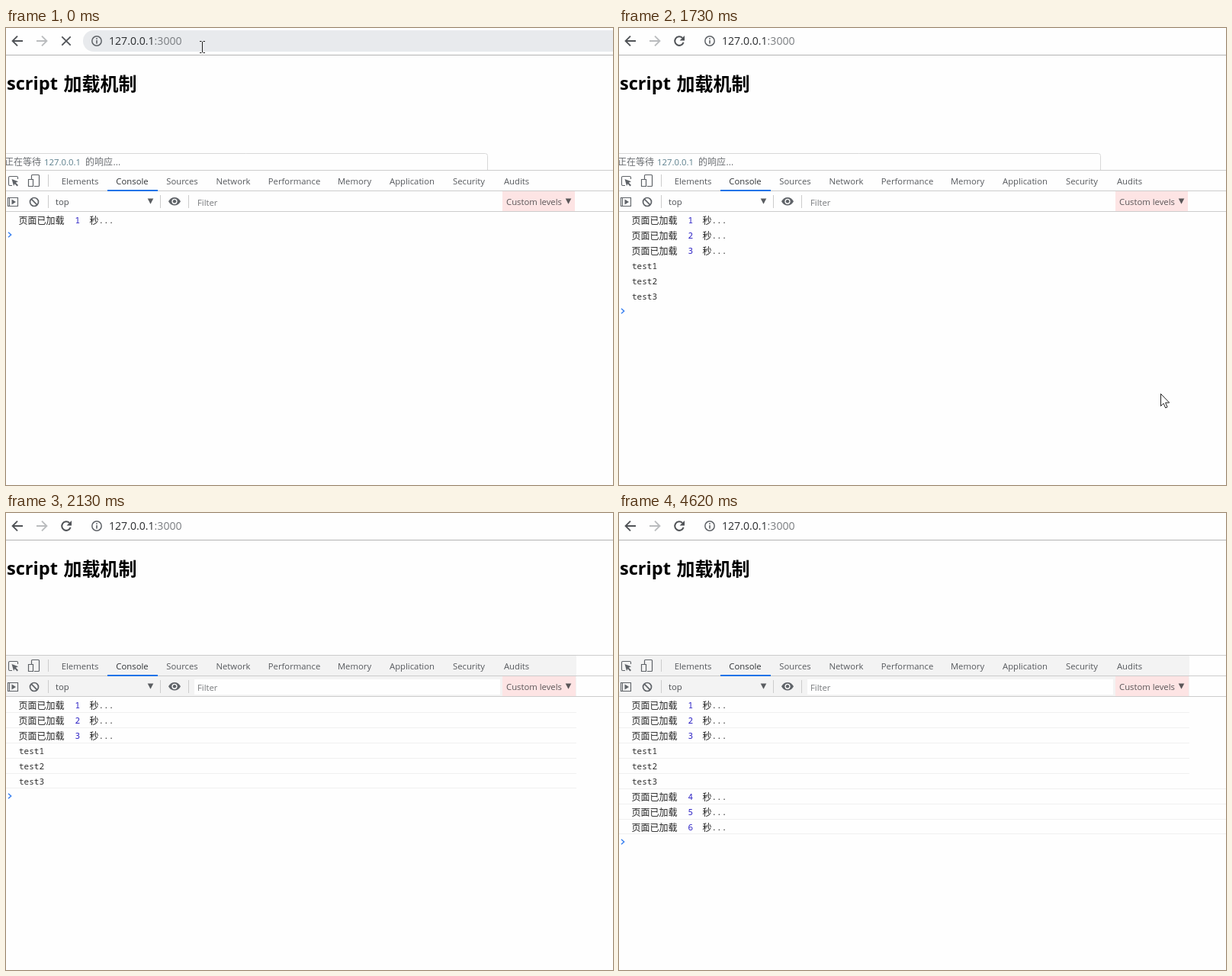
Write an HTML page with a canvas that moves like this. It is 796 px wide and 599 px high and loops after 4770 ms.

```html
<!DOCTYPE html>
<html lang="zh-CN">
<head>
<meta charset="utf-8">
<title>script 加载机制</title>
<style>
  html, body { margin: 0; width: 100%; height: 100%; overflow: hidden; background: #fefefe; }
  canvas { display: block; }
</style>
</head>
<body>
<canvas id="stage" width="796" height="599"></canvas>
<script>
const ctx = document.getElementById('stage').getContext('2d');
const W = 796, H = 599, LOOP = 4770;
const SANS = '"Open Sans", "Noto Sans", sans-serif';
const CJK = '"Noto Sans CJK SC", "Noto Sans CJK", sans-serif';
const MONO = '"Noto Sans Mono", "DejaVu Sans Mono", monospace';
const UI = `11.3px ${SANS}`;
const BG = '#fefefe', ICON = '#5f6368', RULE = '#cccccc';

const LOADED = 1730, IDLE = 1970, STATUS_END = 2130;

const tabs = [['Elements', 97], ['Console', 165.5], ['Sources', 231], ['Network', 298],
  ['Performance', 378], ['Memory', 457], ['Application', 532.5], ['Security', 607], ['Audits', 669.5]];

// Each log entry: time it appears, and a second count or a plain message
const log = [[0, 1], [710, 2], [1580, 3], [1730, 'test1'], [1730, 'test2'], [1730, 'test3'],
  [2680, 4], [3620, 5], [4620, 6]];

// Pointer stops: start time, x, y
const stops = [[1580, 434, 132], [1730, 710, 479], [1850, 736, 521]];

function text(str, x, y, font, color, align = 'left') {
  ctx.font = font;
  ctx.fillStyle = color;
  ctx.textAlign = align;
  ctx.fillText(str, x, y);
}

function rect(x, y, w, h, color) {
  ctx.fillStyle = color;
  ctx.fillRect(x, y, w, h);
}

function stroke(d, color, width = 1) {
  ctx.strokeStyle = color;
  ctx.lineWidth = width;
  ctx.stroke(new Path2D(d));
}

function fill(d, color) {
  ctx.fillStyle = color;
  ctx.fill(new Path2D(d));
}

function ring(x, y, r, color, width) {
  ctx.beginPath();
  ctx.arc(x, y, r, 0, Math.PI * 2);
  ctx.strokeStyle = color;
  ctx.lineWidth = width;
  ctx.stroke();
}

function disc(x, y, r, color) {
  ctx.beginPath();
  ctx.arc(x, y, r, 0, Math.PI * 2);
  ctx.fillStyle = color;
  ctx.fill();
}

function addressBar(t) {
  const loading = t < LOADED;
  if (loading) fill('M796 3H115a14 14 0 0 0 0 28H796z', '#e8eaed');
  stroke('M22 17H9.5M15 10.6L8.6 17L15 23.4', '#505357', 1.9);
  stroke('M40 17H52.5M47 10.6L53.4 17L47 23.4', '#babcbe', 1.9);
  if (loading) {
    stroke('M73.3 11.3L84.7 22.7M84.7 11.3L73.3 22.7', '#505357', 1.8);
  } else {
    stroke('M83.2 13A5.8 5.8 0 1 0 84.6 18.7', '#505357', 2);
    fill('M86 10V16.4H79.6z', '#505357');
  }
  ring(119, 17, 6.2, ICON, 1.5);
  rect(118.2, 16, 1.6, 4.6, ICON);
  rect(118.2, 13.2, 1.6, 1.7, ICON);
  const font = `14.1px ${SANS}`;
  text('127.0.0.1', 135, 22, font, '#2b2d30');
  text(':3000', 135 + ctx.measureText('127.0.0.1').width, 22, font, '#7a7d81');
  rect(0, 35, W, 1, '#b4b4b4');
}

function statusBubble(t) {
  if (t >= STATUS_END) return;
  ctx.globalAlpha = t < IDLE ? 1 : 0.5;
  stroke('M0 164.5H628.5a3 3 0 0 1 3 3V186', '#d8d8d8');
  const gray = '#6b6e72';
  text('正在等待', -2, 180, `12px ${CJK}`, gray);
  text('127.0.0.1', 50, 180, `11.35px ${SANS}`, '#5b7f8c');
  text('的响应', 104, 180, `12px ${CJK}`, gray);
  text('...', 140.5, 180, `12px ${SANS}`, gray);
  ctx.globalAlpha = 1;
}

function panelIcons() {
  // Inspect and device buttons
  stroke('M8 206.5H5a1.5 1.5 0 0 1-1.5-1.5V196a1.5 1.5 0 0 1 1.5-1.5H14a1.5 1.5 0 0 1 1.5 1.5V198', ICON, 1.1);
  fill('M7.5 198L16 201.3L12.8 202.7L16 206L14.6 207.4L11.4 204.2L10.1 207z', ICON);
  stroke('M33.5 198V193.5a1 1 0 0 1 1-1H42.5a1 1 0 0 1 1 1V206.5a1 1 0 0 1-1 1H37', ICON, 1.2);
  stroke('M29.5 198.5H35.5V207.5H29.5z', ICON, 1.2);
  // Sidebar, clear and eye buttons
  stroke('M2.5 222.5H15.5V233.5H2.5zM4.5 222.5V233.5', ICON, 1.1);
  fill('M7.5 224.5L13 228L7.5 231.5z', ICON);
  ring(37, 228, 5.5, ICON, 1.7);
  stroke('M33.2 224.2L40.8 231.8', ICON, 1.7);
  fill('M213 227.3Q216 222 221 222T229 227.3Q226 232.6 221 232.6T213 227.3z', ICON);
  disc(221, 227.3, 3.6, BG);
  disc(221, 227.3, 2.2, ICON);
  // Separators
  rect(55, 192, 1, 16, RULE);
  for (const x of [55, 202, 239]) rect(x, 219, 1, 17, RULE);
}

function devtools(t) {
  const idle = t >= IDLE;
  if (idle) {
    rect(0, 187, 748, 53, '#f3f3f3');
    rect(247, 218, 401, 20, BG);
  }
  for (const y of [186, 213, 240]) rect(0, y, W, 1, RULE);
  rect(133, 212, 66, 2, '#1a73e8');
  rect(651, 214, idle ? 96 : 95, 26, '#fde4e4');
  panelIcons();
  for (const [name, x] of tabs) {
    text(name, x, 205, UI, name === 'Console' ? '#303336' : '#56595d', 'center');
  }
  text('top', 65, 232, UI, '#4d5054');
  text('Filter', 251, 233, UI, '#77797c');
  text('Custom levels', 656, 232, UI, '#5a5658');
  fill('M185.7 223.5H193.3L189.5 230.7z', '#5a5d61');
  fill('M733.7 223.5H741.3L737.5 230.7z', '#5a5658');
}

function row(value, y) {
  const mono = `11px ${MONO}`;
  if (typeof value === 'string') {
    text(value, 17, y + 4, mono, '#303030');
    return;
  }
  text('页面已加载', 16.5, y + 4.5, `12px ${CJK}`, '#222222');
  text(value, 90.5, y + 4, mono, '#2a1fc4');
  text('秒', 109.5, y + 4.5, `12px ${CJK}`, '#222222');
  text('...', 121.5, y + 4, mono, '#222222');
}

function consoleRows(t) {
  const shown = log.filter(([at]) => t >= at);
  const last = shown.length - 1;
  shown.forEach(([, value], i) => {
    row(value, 252 + i * 20);
    if (t < IDLE) return;
    // Rules reach the edge once the list has grown past the messages
    const wide = i > 5 || (i === 5 && last > 5);
    rect(0, 261 + i * 20 - (i === last ? 1 : 0), wide ? W : 748, 1, '#f0f0f0');
  });
  const y = 271 + last * 20;
  stroke(`M3 ${y - 3.2}L6.6 ${y}L3 ${y + 3.2}`, '#3b82f0', 1.5);
}

function pointer(t) {
  if (t < stops[0][0]) {
    stroke('M254 17.5H256.5M258.5 17.5H261M254 32.5H256.5M258.5 32.5H261M257.5 18V32', '#222222');
    return;
  }
  if (t >= IDLE) return;
  const [, x, y] = stops.filter(([at]) => t >= at).pop();
  ctx.save();
  ctx.translate(x + 0.5, y + 0.5);
  const arrow = 'M0 0V16L3.6 12.6L6.2 18.4L8.6 17.4L6.1 11.6H11.2z';
  fill(arrow, '#ffffff');
  stroke(arrow, '#222222');
  ctx.restore();
}

function draw(t) {
  rect(0, 0, W, H, BG);
  addressBar(t);
  text('script', 1, 81, `bold 23.6px ${SANS}`, '#000000');
  text('加载机制', 75.5, 81.5, `bold 24px ${CJK}`, '#000000');
  statusBubble(t);
  devtools(t);
  consoleRows(t);
  pointer(t);
}

let start;
function tick(now) {
  start ??= now;
  draw(Math.max(0, now - start) % LOOP);
  requestAnimationFrame(tick);
}
draw(0);
requestAnimationFrame(tick);
</script>
</body>
</html>
```
